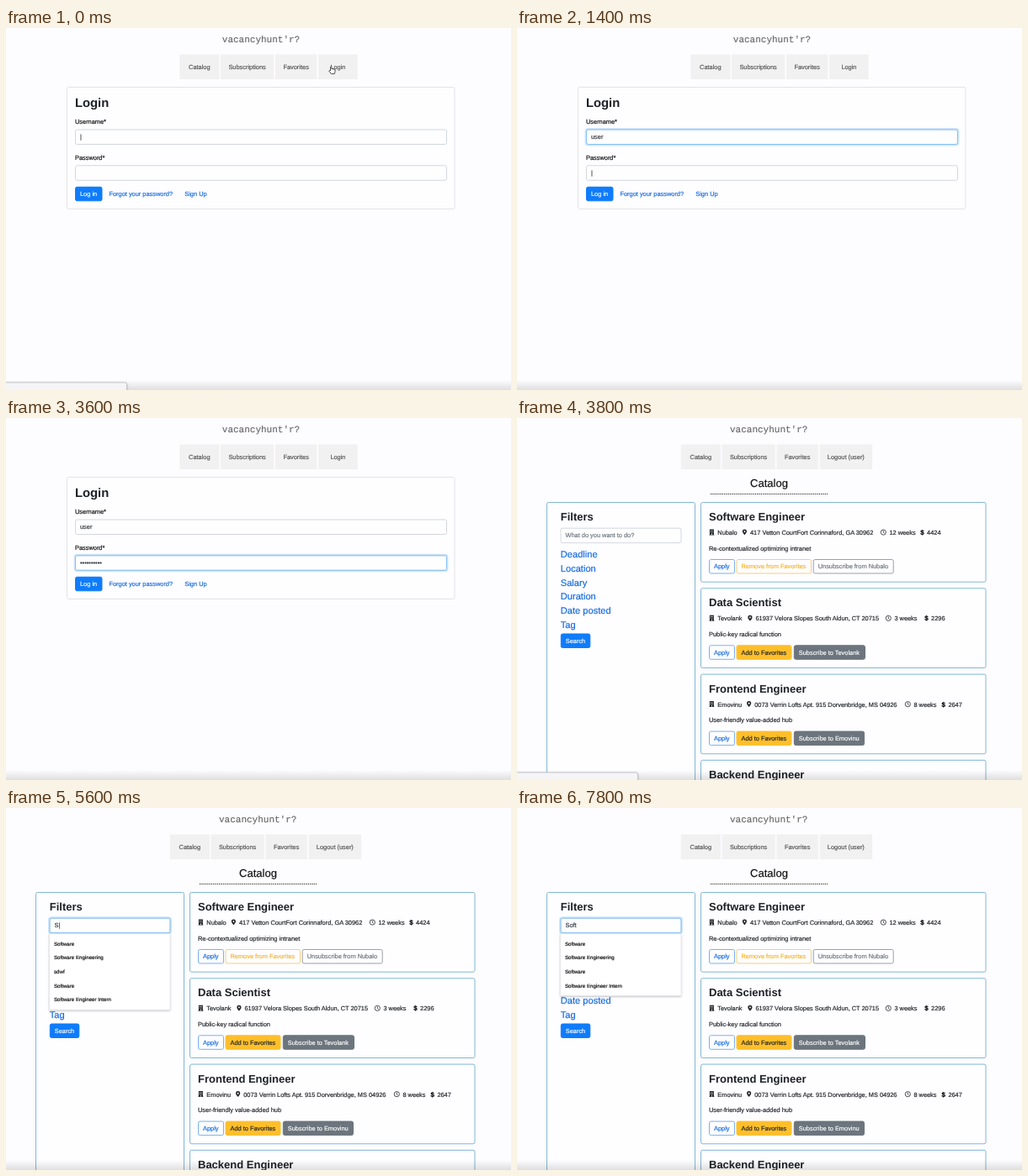
Write an HTML page that moves like this. It is 600 px wide and 431 px high and loops after 8000 ms.

```html
<!DOCTYPE html>
<html lang="en">
<head>
<meta charset="utf-8">
<title>Job catalog</title>
<style>
html, body { margin: 0; width: 100%; height: 100%; overflow: hidden; background: #fdfcfe; }
svg { display: block; width: 600px; height: 431px; font: 7.4px "Liberation Sans", Arial, sans-serif; text-rendering: geometricPrecision; }
text { white-space: pre; fill: currentColor; stroke: currentColor; stroke-width: .18; }
.brand { font: 11px "Liberation Mono", "Courier New", monospace; color: #6c6a6c; }
.h { font-size: 13px; font-weight: bold; color: #1d2126; stroke: none; }
.link { color: #126ae0; }
</style>
</head>
<body>
<svg id="stage" viewBox="0 0 600 431"></svg>
<script>
const LOOP = 8000, BLUE = '#0f7cfb', LINK = '#126ae0', GREY = '#6c757d', EDGE = '#d3d8de', FRAME = '#80b8d6';
const stage = document.getElementById('stage');

const text = (x, y, s, attrs = 'color="#212529"') => `<text x="${x}" y="${y}" ${attrs}>${s}</text>`;
const rect = (x, y, w, h, fill, stroke = 'none', rx = 2, more = '') =>
  `<rect x="${x}" y="${y}" width="${w}" height="${h}" rx="${rx}" fill="${fill}" stroke="${stroke}" ${more}/>`;
const button = (x, y, w, s, fill, ink, edge = fill) =>
  rect(x + .5, y + .5, w - 1, 16.5, fill, edge) + text(x + 6, y + 11.3, s, `color="${ink}"`);

// Input with a text slot and a focus ring
const field = (id, x, y, w) =>
  `<g id="${id}Ring" opacity="0">${rect(x - 1, y - 1, w + 2, 19.5, 'none', '#c4e2fb', 3, 'stroke-width="2"')}</g>` +
  rect(x, y, w, 17.5, '#fefeff', EDGE) +
  `<g id="${id}Edge" opacity="0">${rect(x, y, w, 17.5, 'none', '#84c2f5')}</g>` +
  text(x + 5.5, y + 11.2, '', `id="${id}"`);

function header(left, last, lastWidth, brandX) {
  const tabs = [['Catalog', 0, 47], ['Subscriptions', 48.6, 63.4], ['Favorites', 113.7, 49.3], [last, 164.8, lastWidth]];
  return text(brandX, 17.3, "vacancyhunt'r?", 'class="brand"') + tabs.map(([s, x, w]) =>
    rect(left + x, 31.5, w, 29.5, '#f2f1f2', 'none', 0) +
    text(left + x + w / 2, 48.6, s, 'color="#555" text-anchor="middle"')).join('');
}

const building = (x, y) => `<path transform="translate(${x} ${y})" fill="#24282c" fill-rule="evenodd"
  d="M.6 0h5v6.4h.6v.6H0v-.6h.6zM1.8 1.2v.9h.9v-.9zM3.5 1.2v.9h.9v-.9zM1.8 2.9v.9h.9v-.9zM3.5 2.9v.9h.9v-.9zM2.6 5v1.4h1V5z"/>`;
const pin = (x, y) => `<path transform="translate(${x} ${y})" fill="#24282c" fill-rule="evenodd"
  d="M2.6 7C1.6 5.3 0 4.2 0 2.6a2.6 2.6 0 0 1 5.2 0C5.2 4.2 3.6 5.3 2.6 7zM2.6 1.7a.9.9 0 1 0 .01 0z"/>`;
const clock = (x, y) => `<g fill="none" stroke="#24282c" stroke-width=".8"><circle cx="${x}" cy="${y}" r="3.1"/>
  <path d="M${x} ${y - 2}v2.2l1.3 .9"/></g>`;

function card(y, job) {
  const base = y + 38.5, top = y + 32, [pinX, clockX, cashX] = job.at;
  return rect(218.5, y, 338.5, 94.7, '#fefdff', FRAME) +
    text(228, y + 21.6, job.title, 'class="h"') +
    building(228.3, top) + text(238.3, base, job.firm) +
    pin(pinX, top) + text(pinX + 9.2, base, job.place) +
    clock(clockX, y + 35.6) + text(clockX + 7.1, base, job.weeks + ' weeks') +
    text(cashX, base, '$', 'font-weight="bold" font-size="8"') + text(cashX + 7.8, base, job.pay) +
    text(228, y + 57.1, job.about) +
    button(228, y + 67.5, 31, 'Apply', '#fefdff', LINK, '#78b2ea') +
    (job.saved
      ? button(260.5, y + 67.5, 89.5, 'Remove from Favorites', '#fefdff', '#f3b52f', '#f5cf7c') +
        button(351.7, y + 67.5, 96, 'Unsubscribe from ' + job.firm, '#fefdff', GREY, '#9aa0a6')
      : button(260.5, y + 67.5, 66, 'Add to Favorites', '#ffbf2b', '#212529') +
        button(328.8, y + 67.5, job.wide, 'Subscribe to ' + job.firm, GREY, '#fff'));
}

const jobs = [
  { title: 'Software Engineer', firm: 'Nubalo', place: '417 Vetton CourtFort Corinnaford, GA 30962', weeks: 12, pay: 4424,
    about: 'Re-contextualized optimizing intranet', saved: true, at: [267.8, 435.3, 479.3] },
  { title: 'Data Scientist', firm: 'Tevolank', place: '61937 Velora Slopes South Aldun, CT 20715', weeks: 3, pay: 2296,
    about: 'Public-key radical function', wide: 85.2, at: [274.3, 441.3, 484.3] },
  { title: 'Frontend Engineer', firm: 'Emovinu', place: '0073 Verrin Lofts Apt. 915 Dorvenbridge, MS 04926', weeks: 8, pay: 2647,
    about: 'User-friendly value-added hub', wide: 84.2, at: [273, 464.3, 504.6] },
  { title: 'Backend Engineer', firm: '', place: '', weeks: 6, pay: '', about: '', wide: 60, at: [273, 464, 504] }
];

const login = header(206.3, 'Login', 46.7, 256.8) +
  rect(72.5, 70.5, 460.5, 145, '#fefdff', '#e3e4e8') +
  text(82, 93.8, 'Login', 'class="h" style="font-size:14.8px"') +
  text(82, 114.4, 'Username*', 'color="#111"') + field('user', 82.5, 121, 441) +
  text(82, 157, 'Password*', 'color="#111"') + field('pass', 82.5, 163.8, 441) +
  button(82, 188.8, 32.5, 'Log in', BLUE, '#fff') +
  text(122.5, 200.1, 'Forgot your password?', 'class="link"') +
  text(212.3, 200.1, 'Sign Up', 'class="link"') +
  `<path id="hand" transform="translate(383.3 45)" fill="#fff" stroke="#222" stroke-width=".8" stroke-linejoin="round"
    d="M2.2 5.8V1.2Q3 .1 3.7 1.2V3.8Q4.5 3.1 5.2 4Q6 3.4 6.6 4.3Q7.6 4 7.7 5V7.3L6.9 9.6H3.1L.4 6.2Q.7 5 2.2 5.8z"/>`;

const catalog = header(194.8, 'Logout (user)', 62.5, 253) +
  text(299.5, 82.4, 'Catalog', 'font-size="13" text-anchor="middle" color="#111"') +
  '<path d="M230 90.5H369" stroke="#222" stroke-dasharray="1.2 1.1"/>' +
  rect(35.5, 100.5, 176, 350, '#fefdff', FRAME) +
  text(51.8, 122.1, 'Filters', 'class="h"') + field('search', 52, 131.2, 143) +
  ['Deadline', 'Location', 'Salary', 'Duration', 'Date posted', 'Tag'].map((s, i) =>
    text(51.8, 166.1 + i * 16.7, s, 'class="link" font-size="11.1"')).join('') +
  button(51.8, 256.5, 35.5, 'Search', BLUE, '#fff') +
  jobs.map((job, i) => card(100.5 + i * 102.3, job)).join('') + '<g id="menu"></g>';

stage.innerHTML = `<defs>
  <linearGradient id="fade" x2="0" y2="1"><stop stop-opacity="0"/><stop offset="1" stop-opacity=".12"/></linearGradient>
  <filter id="soft" x="-10%" y="-10%" width="120%" height="130%"><feDropShadow dx="0" dy="1" stdDeviation="1" flood-opacity=".25"/></filter>
  </defs><g id="login">${login}</g><g id="catalog">${catalog}</g>
  ${rect(0, 419, 600, 12, 'url(#fade)', 'none', 0)}
  <g id="status" filter="url(#soft)">${rect(-3, 422, 146.5, 14, '#f5f4f6', '#c3c3c5')}</g>`;

const $ = id => document.getElementById(id);
const show = (id, on) => $(id).setAttribute('visibility', on ? 'visible' : 'hidden');
const dots = n => '•'.repeat(n);

// Key presses as [time, value]; the first entry gives focus
const keys = {
  user: [[0, ''], [1000, 'us'], [1200, 'user']],
  pass: [[1400, ''], [1800, dots(2)], [2000, dots(4)], [2200, dots(5)], [2400, dots(6)],
    [2600, dots(7)], [2800, dots(8)], [3000, dots(9)], [3100, dots(10)]],
  search: [[4800, ''], [5400, 'S'], [5800, 'So'], [6000, 'Sof'], [6200, 'Soft'], [6300, 'Softr'], [7300, 'Soft']]
};
const blur = { user: 1400, pass: 3800, search: LOOP + 1 };
const titles = ['Software', 'Software Engineering', 'sdwf', 'Software', 'Software Engineer Intern'];
const ramp = ms => Math.min(1, Math.max(0, ms / 150));

function type(id, t) {
  const start = keys[id][0][0];
  const [time, value] = keys[id].filter(k => k[0] <= t).pop() || [0, ''];
  const focused = t >= start && t < blur[id];
  const caret = focused && (t - time) % 1000 < 500 ? '|' : '';
  const hint = id === 'search' && !value;
  $(id).textContent = hint ? caret + 'What do you want to do?' : value + caret;
  $(id).setAttribute('color', hint ? GREY : '#343a40');
  const glow = ramp(t - start) - ramp(t - blur[id]);
  $(id + 'Edge').setAttribute('opacity', glow);
  $(id + 'Ring').setAttribute('opacity', glow * .8);
  return value;
}

function menu(query) {
  const hits = query ? titles.filter(s => s.toLowerCase().startsWith(query.toLowerCase())) : [];
  $('menu').innerHTML = hits.length
    ? rect(51.5, 149.8, 143.5, hits.length * 16.7 + 7, '#fff', '#dedee1', 1, 'stroke-width=".6" filter="url(#soft)"') +
      hits.map((s, i) => text(57, 163.5 + i * 16.7, s, 'font-size="6.15" color="#111"')).join('')
    : '';
}

function draw() {
  const t = performance.now() % LOOP, inside = t >= 3800;
  $('login').style.display = inside ? 'none' : '';
  $('catalog').style.display = inside ? '' : 'none';
  show('status', t < 600 || inside && t < 4400);
  show('hand', t < 1000);
  type('user', t);
  type('pass', t);
  menu(type('search', t));
  requestAnimationFrame(draw);
}
draw();
</script>
</body>
</html>
```
